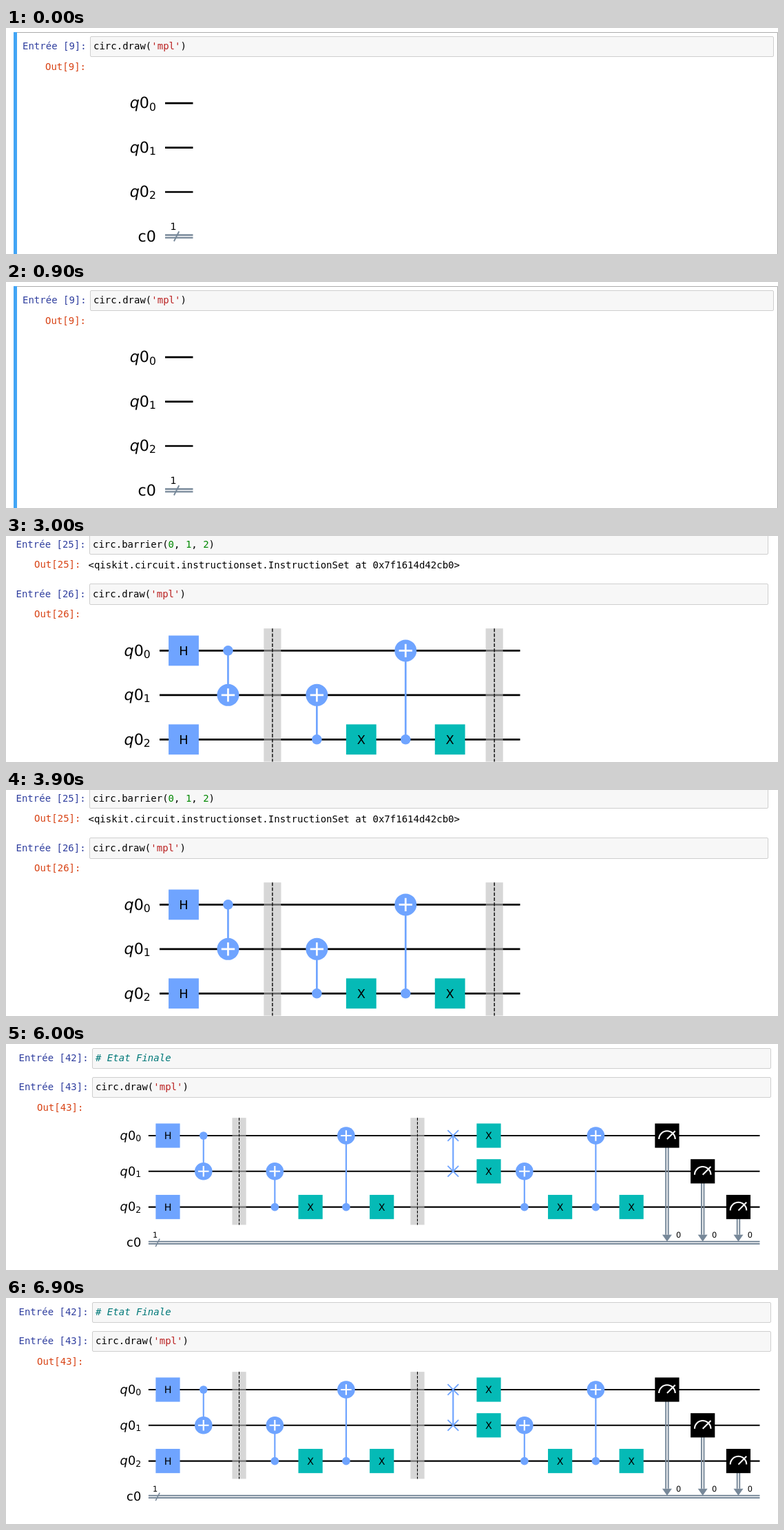
These frames come from a looping animation (1121x328 px, 7500 ms). An HTML page:

```html
<!DOCTYPE html>
<html lang="fr">
<head>
<meta charset="utf-8">
<title>Circuit</title>
<style>
html, body { margin: 0; width: 100%; height: 100%; overflow: hidden; background: #fff; }
svg { display: block; width: 1121px; height: 328px; }
.scene { visibility: hidden; animation: show 7.5s step-end infinite; }
@keyframes show { 0% { visibility: visible; } 20%, 100% { visibility: hidden; } }
.mono { font: 14px "DejaVu Sans Mono", monospace; white-space: pre; }
.label { font-family: "DejaVu Sans", sans-serif; text-rendering: geometricPrecision; }
.in { fill: #303f9f; }
.out { fill: #d84315; }
.str { fill: #ba2121; }
.num { fill: #080; }
.comment { fill: #007979; font-style: italic; }
</style>
</head>
<body>
<svg id="stage" viewBox="0 0 1121 328"></svg>
<script>
const BLUE = '#6fa4ff', TEAL = '#05bab6', SLATE = '#778899';
const DRAW = `circ.draw(<tspan class="str">'mpl'</tspan>)`;

// Gates in drawing order: [kind, column, first qubit, second qubit]
const GATES = [
  ['H', 0, 0], ['H', 0, 2], ['cx', 1, 0, 1], ['barrier', 2],
  ['cx', 3, 2, 1], ['X', 4, 2], ['cx', 5, 2, 0], ['X', 6, 2], ['barrier', 7],
  ['swap', 8, 0, 1], ['X', 9, 0], ['X', 9, 1],
  ['cx', 10, 2, 1], ['X', 11, 2], ['cx', 12, 2, 0], ['X', 13, 2],
  ['measure', 14, 0], ['measure', 15, 1], ['measure', 16, 2]
];

const rect = (x, y, w, h, fill, extra = '') =>
  `<rect x="${x}" y="${y}" width="${w}" height="${h}" fill="${fill}" ${extra}/>`;
const path = (d, color, width, extra = '') =>
  `<path d="${d}" fill="none" stroke="${color}" stroke-width="${width}" ${extra}/>`;
const disc = (x, y, r) => `<circle cx="${x}" cy="${y}" r="${r}" fill="${BLUE}"/>`;
const mono = (x, y, text, cls = '') => `<text class="mono ${cls}" x="${x}" y="${y}">${text}</text>`;
const label = (x, y, size, text, anchor = 'middle') =>
  `<text class="label" x="${x}" y="${y}" font-size="${size}" text-anchor="${anchor}">${text}</text>`;

const field = (x, y, w, h) => rect(x + .5, y + .5, w - 1, h - 1, '#f7f7f7', 'stroke="#cfcfcf" rx="1.5"');

// A notebook input: prompt and code line, its field starting at (x, y)
const input = (x, y, w, h, n, code, baseline, promptX) =>
  field(x, y, w, h) + mono(promptX, baseline, `Entrée [${n}]:`, 'in') + mono(x + 5, baseline, code);
const output = (x, baseline, n) => mono(x, baseline, `Out[${n}]:`, 'out');

// u is the grid step; (x0, y0) the centre of the first column on the first wire
function circuit(x0, y0, u, end, columns) {
  const X = c => x0 + c * u, Y = q => y0 + q * u;
  const start = x0 - .543 * u, thick = .042 * u, bus = Y(3);
  const box = (x, y, fill) => rect(x - .34 * u, y - .34 * u, .68 * u, .68 * u, fill);
  const letter = (name, fill) => (c, q) =>
    box(X(c), Y(q), fill) + label(X(c), Y(q) + .1 * u, .276 * u, name);
  const link = (c, a, b) => path(`M${X(c)} ${Y(a)}V${Y(b)}`, BLUE, thick);

  const draw = {
    H: letter('H', BLUE),
    X: letter('X', TEAL),
    cx(c, a, b) {
      const x = X(c), y = Y(b), r = .15 * u;
      return link(c, a, b) + disc(x, Y(a), .113 * u) + disc(x, y, .248 * u) +
        path(`M${x - r} ${y}h${2 * r}M${x} ${y - r}v${2 * r}`, '#fff', thick);
    },
    swap(c, a, b) {
      const r = .152 * u;
      return link(c, a, b) + [a, b].map(q =>
        path(`M${X(c) - r} ${Y(q) - r}l${2 * r} ${2 * r}m0 ${-2 * r}l${-2 * r} ${2 * r}`, BLUE, .036 * u)).join('');
    },
    barrier(c) {
      const top = Y(0) - .5 * u;
      return rect(X(c) - .195 * u, top, .39 * u, 3 * u, '#bdbdbd', 'opacity=".6"') +
        path(`M${X(c)} ${top}v${3 * u}`, '#000', .021 * u, `stroke-dasharray="${.079 * u} ${.034 * u}"`);
    },
    measure(c, q) {
      const x = X(c), y = Y(q), r = .2275 * u, base = y + .0975 * u, gap = .034 * u;
      const head = bus - .225 * u;
      return path(`M${x - gap} ${y}V${head}M${x + gap} ${y}V${head}`, SLATE, .038 * u) +
        `<path d="M${x - .135 * u} ${head}h${.27 * u}L${x} ${bus - .03 * u}z" fill="${SLATE}"/>` +
        box(x, y, '#000') +
        path(`M${x - r} ${base}a${r} ${r} 0 0 1 ${2 * r} 0M${x} ${base}L${x + r} ${y - .13 * u}`, '#fff', .04 * u) +
        label(x + .255 * u, bus - .145 * u, .22 * u, '0', 'start');
    }
  };

  const name = (q, text) => label(start - .205 * u, Y(q) + .112 * u, .345 * u, text, 'end');
  const wires = [0, 1, 2].map(q =>
    name(q, `<tspan font-style="oblique">q</tspan>0<tspan dy="${.05 * u}" font-size="${.242 * u}">${q}</tspan>`) +
    path(`M${start} ${Y(q)}H${end}`, '#000', thick)).join('');
  const register = name(3, 'c0') +
    path(`M${start} ${bus - .031 * u}H${end}M${start} ${bus + .031 * u}H${end}`, SLATE, .038 * u) +
    path(`M${start + .2 * u} ${bus + .11 * u}l${.115 * u} ${-.22 * u}`, SLATE, .03 * u) +
    label(start + .186 * u, bus - .145 * u, .22 * u, '1');

  return wires + register + GATES.filter(g => g[1] < columns)
    .map(([kind, ...args]) => draw[kind](...args)).join('');
}

const scenes = [
  path('M11 6.5H1120.5V328', '#ababab', 1) + rect(11, 6, 5, 322, '#42a5f5') +
    input(122, 12, 993, 30, 9, DRAW, 31, 24) + output(57, 61, 9) +
    circuit(266, 109.2, 64.4, 271.5, 0),

  input(118, 9, 986, 30, 16, DRAW, 29, 12) + output(38, 58, 16) +
    circuit(255, 106.3, 64.4, 357.5, 2),

  input(121, -4, 986, 31, 25,
    'circ.barrier(' + [0, 1, 2].map(n => `<tspan class="num">${n}</tspan>`).join(', ') + ')', 17, 14.5) +
    output(41, 46, 25) +
    mono(119.5, 47, '&lt;qiskit.circuit.instructionset.InstructionSet at 0x7f1614d42cb0&gt;') +
    input(121, 69, 986, 31, 26, DRAW, 89, 14.5) + output(41, 118, 26) +
    circuit(258, 166.4, 64.45, 746.5, 8),

  field(121, -24, 986, 30) +
    input(121, 18, 986, 30, 37, DRAW, 38, 14.5) + output(41, 67, 37) +
    circuit(252, 112.7, 61.5, 1087.5, 14),

  input(125, 6, 986, 30, 42, '<tspan class="comment"># Etat Finale</tspan>', 25, 18.5) +
    input(125, 48, 986, 30, 43, DRAW, 67, 18.5) + output(45, 97, 43) +
    circuit(235, 133, 51.78, 1094.5, 17)
];

document.getElementById('stage').innerHTML = scenes.map((content, i) =>
  `<g class="scene" style="animation-delay:${i ? i * 1.5 - 7.5 : 0}s">${content}</g>`).join('');
</script>
</body>
</html>
```
